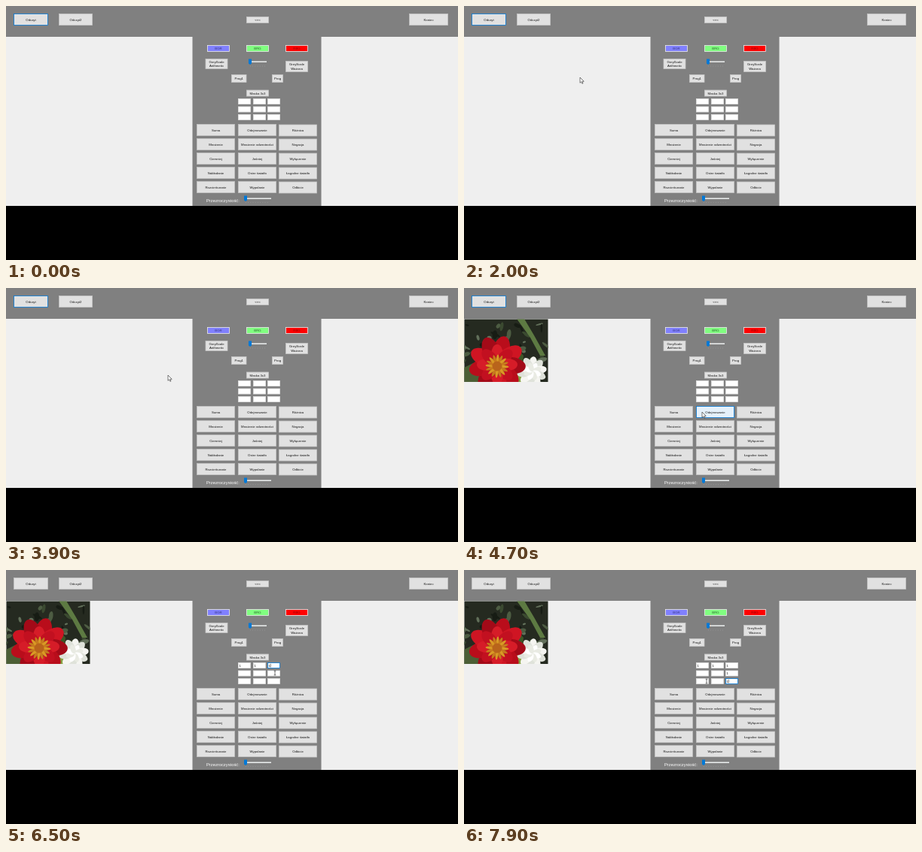
These frames come from a looping animation (600 px wide and 338 px high, 8 s). An HTML page:

```html
<!DOCTYPE html>
<html lang="pl">
<head>
<meta charset="utf-8">
<style>
html, body { margin: 0; width: 100%; height: 100%; overflow: hidden; background: #000; }
svg { display: block; width: 600px; height: 338px; }
text { font-family: "Liberation Sans", Arial, sans-serif; font-size: 4.3px; fill: #111; }
</style>
</head>
<body>
<svg id="stage" viewBox="0 0 600 338">
  <rect width="600" height="338" fill="#000"/>
  <rect width="600" height="266" fill="#efefef"/>
  <rect width="600" height="41" fill="#808080"/>
  <rect x="247.5" y="41" width="171" height="225" fill="#808080"/>
  <g id="photo">
    <clipPath id="crop"><rect x="0.5" y="41.5" width="111" height="83.5"/></clipPath>
    <g clip-path="url(#crop)">
      <rect y="41" width="112" height="84" fill="#252a20"/>
      <g id="leaves"></g>
      <path d="M70 41L88 66L101 90L108 90L93 63L80 41Z" fill="#5d7a42"/>
      <path d="M62 92L72 82L79 90L76 125H62Z" fill="#3d5727"/>
      <path d="M0 106L12 100L24 125H0Z" fill="#4c5f35"/>
      <path d="M60 117L76 108L78 125H56Z" fill="#87a345"/>
      <g id="white"></g>
      <g id="red"></g>
    </g>
  </g>
  <g id="ui"></g>
  <path id="arrow" d="M0 0V7.3L1.7 5.8L2.9 8.3L4 7.8L2.9 5.3H5.2Z" fill="#fff" stroke="#222" stroke-width=".6"/>
  <path id="beam" d="M-1.3 -2.8H1.3M0 -2.8V2.8M-1.3 2.8H1.3" fill="none" stroke="#333" stroke-width=".7"/>
</svg>
<script>
const $ = id => document.getElementById(id);
const ui = $('ui'), BLUE = '#0078d7', LOOP = 8000;

function add(parent, tag, attrs, text) {
  const el = document.createElementNS('http://www.w3.org/2000/svg', tag);
  for (const k in attrs) el.setAttribute(k, attrs[k]);
  if (text !== undefined) el.textContent = text;
  parent.appendChild(el);
  return el;
}

const box = (x, y, w, h, fill, stroke) => add(ui, 'rect',
  { x: x + .5, y: y + .5, width: w - 1, height: h - 1, fill, stroke, 'stroke-width': .8 });

function button(x, y, w, h, label, fill = '#e1e1e1', stroke = '#c4c4c4', ink = '#111') {
  const el = box(x, y, w, h, fill, stroke);
  const lines = label.split('\n');
  lines.forEach((s, i) => add(ui, 'text', {
    x: x + w / 2, y: y + h / 2 + 1.5 + (i - (lines.length - 1) / 2) * 5.2,
    'text-anchor': 'middle', style: 'fill:' + ink
  }, s));
  return el;
}

function slider(x, y, end, ticksY) {
  add(ui, 'rect', { x: x + 4, y: y + 2.9, width: end - x - 4, height: 1.6, fill: '#e7eaea' });
  add(ui, 'path', { d: `M${x + 2} ${ticksY}H${end - 2}`, stroke: '#a5a5a5', 'stroke-width': .6, 'stroke-dasharray': '.8 2.4' });
  add(ui, 'path', { d: `M${x} ${y}h4v6l-2 1.6l-2-1.6z`, fill: BLUE });
}

// Photo shapes
let seed = 7;
const rnd = () => (seed = seed * 16807 % 2147483647) / 2147483647;
for (let i = 0; i < 46; i++) {
  const x = rnd() * 112, y = 41 + rnd() * 62;
  add($('leaves'), 'ellipse', {
    cx: x, cy: y, rx: 2 + rnd() * 6, ry: 1 + rnd() * 2.4,
    fill: ['#3b4a30', '#4d5c42', '#171c14', '#62705a'][i % 4],
    transform: `rotate(${rnd() * 180} ${x} ${y})`
  });
}
function petals(parent, cx, cy, n, len, wide, turn, fills) {
  for (let i = 0; i < n; i++) add($(parent), 'ellipse', {
    cx, cy: cy - len / 2, rx: wide, ry: len / 2, fill: fills[i % fills.length],
    transform: `rotate(${turn + i * 360 / n} ${cx} ${cy})`
  });
}
petals('white', 90, 111, 10, 20, 5.5, 8, ['#f5f5f1', '#dfe2da']);
petals('white', 91, 111, 8, 12, 3.5, 25, ['#fff', '#e9ebe3']);
petals('red', 44, 101, 9, 38, 11, 16, ['#b90d1b', '#cf1523', '#a30a18']);
petals('red', 44, 102, 8, 27, 8, 0, ['#d61c28', '#c21020']);
add($('red'), 'circle', { cx: 44, cy: 104, r: 12.5, fill: '#a3321c' });
petals('red', 44, 104, 16, 15.5, 1.9, 4, ['#d99a25', '#c77a1d']);
add($('red'), 'circle', { cx: 44, cy: 104, r: 6.5, fill: '#b9641b' });

// Controls
const open = button(10, 10, 46, 16, 'Odczyt');
button(70, 10, 45, 16, 'Odczyt2');
button(319, 14, 30, 9, '<<<');
button(535, 10, 52, 16, 'Koniec');
button(267, 52, 30, 9, 'BGR', '#8080ff', '#ececec', '#33337a');
button(319, 52, 30, 9, 'BRG', '#80ff80', '#ececec', '#245a24');
button(371, 52, 30, 9, 'RBG', '#ff0000', '#ececec', '#8c0000');
button(264.5, 70, 30, 14, 'GreyScale\nArithmetic');
button(371, 73, 30, 15, 'GreyScale\nWażona');
button(299, 91, 20.5, 11, 'Prog1');
button(353, 91, 15, 11, 'Prog');
button(319, 111.5, 30, 9, 'Maska 3x3');
slider(322, 70.5, 346, 80);

const cells = [];
for (let i = 0; i < 9; i++) {
  const x = [308, 328, 347][i % 3], y = [123, 133.5, 144][i / 3 | 0];
  cells.push({
    rect: box(x, y, 17, 8, '#fff', '#e2e2e2'),
    digit: add(ui, 'text', { x: x + 1.4, y: y + 5.6 }, '1'),
    caret: add(ui, 'path', { d: `M0 ${y + 1.8}V${y + 6.4}`, stroke: '#222', 'stroke-width': .6 }), x
  });
}

const ops = ['Suma', 'Odejmowanie', 'Różnica', 'Mnożenie', 'Mnożenie odwrotności', 'Negacja',
  'Ciemniej', 'Jaśniej', 'Wyłączenie', 'Nakładanie', 'Ostre światło', 'Łagodne światło',
  'Rozcieńczanie', 'Wypalanie', 'Odbicie'].map((s, i) => {
  const c = i % 3, x = [253, 308, 362][c], y = 157 + 19 * (i / 3 | 0) + (c === 2 ? .5 : 0);
  return { x, y, w: 51, h: 16, el: button(x, y, 51, 16, s) };
});
add(ui, 'text', { x: 266, y: 261, style: 'font-size:5.8px;fill:#fff' }, 'Przezroczystość:');
slider(316, 252.5, 352, 261.5);

// Pointer route: time, x, y
const route = [
  [1900, 109, 72], [2000, 154, 95], [2400, 270, 160], [2700, 332, 196], [2900, 332, 210],
  [3200, 331, 209], [3900, 215, 116], [4000, 45, 20], [4200, 40, 18],
  [4300, 393, 244], [4400, 393, 244], [4700, 316, 165], [5000, 319, 130], [5400, 320, 127],
  [5700, 321, 128], [5900, 338, 128], [6100, 339, 128], [6300, 356, 128], [6500, 357, 137],
  [7000, 357, 138], [7200, 356, 148], [7500, 355, 148], [7900, 322, 148]
];
// Field edits: cell, focus time, typing time
const edits = [[0, 5200, 5600], [1, 5900, 6000], [2, 6300, 6400], [5, 6600, 6800], [8, 7200, 7400]];

function pointer(t) {
  let i = route.findIndex(p => p[0] > t);
  if (i < 0) return route[route.length - 1].slice(1);
  if (i === 0) return [-50, -50];
  const [a, x, y] = route[i - 1], [b, u, v] = route[i], k = (t - a) / (b - a);
  return [x + (u - x) * k, y + (v - y) * k];
}
const inside = (x, y, b) => x >= b.x && x < b.x + b.w && y >= b.y && y < b.y + b.h;
const show = (el, on) => el.setAttribute('visibility', on ? 'visible' : 'hidden');

function paint(el, hover, focus) {
  el.setAttribute('fill', hover ? '#e5f1fb' : '#e1e1e1');
  el.setAttribute('stroke', hover || focus ? BLUE : '#c4c4c4');
}

function draw(ms) {
  const t = Math.floor(ms % LOOP / 100) * 100;
  const [x, y] = pointer(t);
  const overCell = cells.some(c => inside(x, y, { x: c.x, y: +c.rect.getAttribute('y') - .5, w: 17, h: 8 }));
  show($('photo'), t >= 4400);
  show($('arrow'), x > 0 && !overCell);
  show($('beam'), overCell);
  for (const id of ['arrow', 'beam']) $(id).setAttribute('transform', `translate(${x} ${y})`);
  paint(open, inside(x, y, { x: 10, y: 10, w: 46, h: 16 }), t < edits[0][1]);
  for (const o of ops) paint(o.el, inside(x, y, o), false);

  const active = edits.filter(e => t >= e[1]).pop();
  cells.forEach((c, i) => {
    const edit = edits.find(e => e[0] === i);
    const typed = !!edit && t >= edit[2], focus = !!active && active[0] === i;
    c.rect.setAttribute('stroke', focus ? BLUE : '#e2e2e2');
    show(c.digit, typed);
    show(c.caret, focus);
    c.caret.setAttribute('transform', `translate(${c.x + (typed ? 4.3 : 1.6)} 0)`);
  });
}

const start = performance.now();
function tick() {
  draw(performance.now() - start);
  requestAnimationFrame(tick);
}
tick();
</script>
</body>
</html>
```
